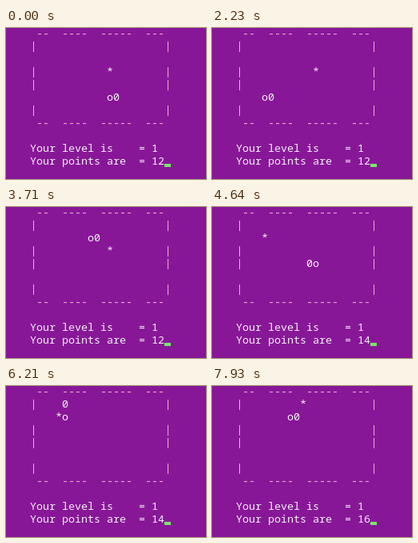
Write an HTML page with a canvas that moves like this. It is 250 px wide and 189 px high and loops after 8 s.

```html
<!DOCTYPE html>
<html lang="en">
<head>
<meta charset="utf-8">
<title>Console snake</title>
<style>
  html, body { margin: 0; width: 100%; height: 100%; overflow: hidden; background: #881798; }
  canvas { display: block; }
</style>
</head>
<body>
<canvas id="screen" width="250" height="189"></canvas>
<script>
const ctx = document.getElementById("screen").getContext("2d");
const LOOP = 8000, CELL_W = 8, CELL_H = 16, LEFT = 30, BASELINE = 11;
const COLORS = { back: "#881798", text: "#f2f2f2", wall: "#efb4cf", cursor: "#77e867" };
const DIRS = { R: [1, 0], L: [-1, 0], U: [0, -1], D: [0, 1] };
const STARS = [[12, 3], [4, 2], [10, 1]];

// Each run: time of its first step, time of its last step, moves.
const RUNS = [
  [130, 1060, "RRRRRR"],
  [1210, 2230, "RRRRRR"],
  [2400, 3310, "RRRUUU"],
  [3540, 3710, "RR"],
  [3860, 4490, "RRDD"],
  [4640, 4640, "L"],
  [4790, 5680, "LLLLLL"],
  [5910, 6210, "UUU"],
  [6440, 6840, "LLD"],
  [7010, 7930, "RRRRRR"]
];

function step(state, move, time) {
  const [dx, dy] = DIRS[move];
  const [x, y] = state.head;
  const head = [(x + dx + 19) % 20 + 1, y + dy];
  const star = STARS[state.eaten];
  const ate = head[0] === star[0] && head[1] === star[1];
  return { time, head, tail: state.head, eaten: state.eaten + (ate ? 1 : 0) };
}

const states = [{ time: 0, head: [13, 5], tail: [12, 5], eaten: 0 }];
for (const [start, end, moves] of RUNS) {
  const gap = (end - start) / Math.max(1, moves.length - 1);
  [...moves].forEach((move, i) =>
    states.push(step(states[states.length - 1], move, Math.round(start + i * gap))));
}

function put(text, col, row, color = COLORS.text, shift = 0) {
  ctx.fillStyle = color;
  [...text].forEach((char, i) =>
    ctx.fillText(char, LEFT + (col + i) * CELL_W + shift, BASELINE + row * CELL_H));
}

function draw({ head, tail, eaten }) {
  ctx.fillStyle = COLORS.back;
  ctx.fillRect(0, 0, 250, 189);
  ctx.font = "13.3333px 'Noto Sans Mono', monospace";

  for (const row of [0, 7]) put(" --  ----  -----  ---", 0, row, COLORS.wall);
  for (const row of [1, 3, 4, 6])
    for (const col of [0, 21]) put("|", col, row, COLORS.wall, 0.5);

  put("*", ...STARS[eaten]);
  put("o", ...tail);
  put("0", ...head);
  put("Your level is    = 1", 0, 9);
  put("Your points are  = " + (12 + 2 * eaten), 0, 10);

  ctx.fillStyle = COLORS.cursor;
  ctx.fillRect(LEFT + 21 * CELL_W, 170, CELL_W, 4);
}

const origin = performance.now();
function tick() {
  const time = (performance.now() - origin) % LOOP;
  draw(states.filter(state => state.time <= time).pop());
  requestAnimationFrame(tick);
}
tick();
</script>
</body>
</html>
```
